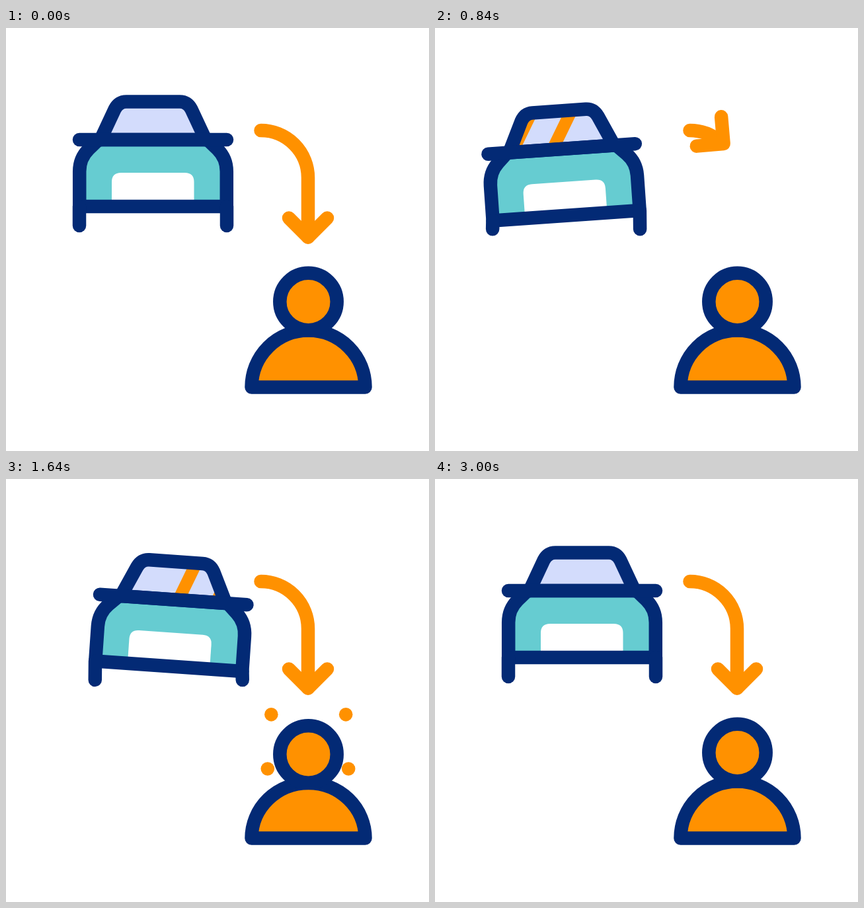
Write an HTML page with a canvas that moves like this. It is 640 px wide and 640 px high and loops after 3320 ms.

```html
<!DOCTYPE html>
<html lang="en">
<head>
<meta charset="utf-8">
<title>Car handover</title>
<style>
  html, body { margin: 0; width: 100%; height: 100%; overflow: hidden; background: #fff; }
  canvas { display: block; width: 640px; height: 640px; }
</style>
</head>
<body>
<canvas id="stage" width="640" height="640"></canvas>
<script>
const LOOP = 3320;
const NAVY = '#032a75', ORANGE = '#ff9100', TEAL = '#66ccd1', GLASS = '#d3dcfc';
const ctx = document.getElementById('stage').getContext('2d');

// Key tables: [time, value] pairs
const WHEEL_X = [[220, 0], [540, -23.5], [750, -24], [1750, 24], [2260, 0]];
const WHEEL_Y = [[220, 0], [540, 5], [1250, 6], [1750, 5], [2260, 0]];
const SAG = [[220, 0], [780, 8.4], [1750, 8.2], [2260, 0]];
const TILT = [[220, 0], [780, -4], [1750, 4], [2260, 0]];
const SHINE = [[200, -80], [520, -31], [840, 12.5], [1340, 68], [1640, 106.5], [2050, 160]];
const REACH = [[220, 202.3], [520, 75], [840, 56], [930, 55], [1340, 87], [1610, 202.3]];
const NUDGE = [[1640, 0], [2340, -12.8], [3000, 0]];
const INSET = [[45, -1], [60, 3.5], [70, 3], [90, 0]];
const DIP = [[1560, 0], [1640, 2.5], [1730, 4], [2000, 0]];
const SPREAD = [[1500, 0.3], [1640, 1], [1820, 1.38], [1960, 1.58], [2240, 1.66]];
const DOT_R = [[1960, 10.3], [2240, 0]];
const DOTS = [[-56, -57.5], [56.5, -57.5], [-61.5, 24.5], [60.5, 24.5]];

// Cubic in-out between keys
function ease(keys, t) {
  if (t <= keys[0][0]) return keys[0][1];
  for (let i = 1; i < keys.length; i++) {
    const [t0, a] = keys[i - 1], [t1, b] = keys[i];
    if (t < t1) {
      const x = (t - t0) / (t1 - t0);
      return a + (b - a) * (x < 0.5 ? 4 * x ** 3 : 1 - 4 * (1 - x) ** 3);
    }
  }
  return keys[keys.length - 1][1];
}

// Monotone curve through the keys
function flow(keys, t) {
  const last = keys.length - 1;
  if (t <= keys[0][0]) return keys[0][1];
  if (t >= keys[last][0]) return keys[last][1];
  const slope = i => (keys[i + 1][1] - keys[i][1]) / (keys[i + 1][0] - keys[i][0]);
  const tangent = i => {
    if (i === 0 || i === last) return 0;
    const a = slope(i - 1), b = slope(i);
    return a * b <= 0 ? 0 : 2 * a * b / (a + b);
  };
  let i = 0;
  while (t >= keys[i + 1][0]) i++;
  const [t0, a] = keys[i], [t1, b] = keys[i + 1];
  const h = t1 - t0, x = (t - t0) / h, y = 1 - x;
  return a * (1 + 2 * x) * y * y + b * (3 - 2 * x) * x * x
    + h * x * y * (tangent(i) * y - tangent(i + 1) * x);
}

const roof = new Path2D('M143 169 L164.5 123 Q170.5 111.5 182 111.5 H263 Q274.5 111.5 280.5 123 L302 169');
const shell = new Path2D('M111.2 270 V217 Q111.2 197 125 183.5 L140 169 H305 L320 183.5 Q333.8 197 333.8 217 V270 Z');
const grille = new Path2D('M160 262 V233 Q160 219 174 219 H270.5 Q284.5 219 284.5 233 V262 Z');
const bar = new Path2D('M111 169 H334');

function stroke(path, color = NAVY) {
  ctx.strokeStyle = color;
  ctx.stroke(path);
}

function fill(path, color) {
  ctx.fillStyle = color;
  ctx.fill(path);
}

function disc(x, y, r) {
  const p = new Path2D();
  p.arc(x, y, r, 0, Math.PI * 2);
  return p;
}

function drawCar(t) {
  const dx = ease(WHEEL_X, t), wheelY = ease(WHEEL_Y, t);
  const dy = wheelY + ease(SAG, t);
  const pose = new DOMMatrix()
    .translate(222.5 + dx, 270 + dy).rotate(ease(TILT, t)).translate(-222.5, -270);
  const posed = path => {
    const p = new Path2D();
    p.addPath(path, pose);
    return p;
  };

  const glass = posed(roof);
  fill(glass, GLASS);
  ctx.save();
  ctx.clip(glass);
  const right = 222.5 + dx + flow(SHINE, t);
  for (const x of [right, right - 59]) {
    fill(new Path2D(`M${x + 17.5} 100 L${x - 31} 200 h-20.5 L${x - 3} 100 Z`), ORANGE);
  }
  ctx.restore();

  const body = posed(shell);
  fill(body, TEAL);
  fill(posed(grille), '#fff');
  stroke(glass);
  stroke(body);
  stroke(posed(bar));
  for (const x of [111, 334]) {
    const top = pose.transformPoint(new DOMPoint(x, 270));
    stroke(new Path2D(`M${top.x} ${top.y} L${x + dx} ${299 + wheelY}`));
  }
}

function drawArrow(t) {
  const R = 71.5, cx = 385.5, cy = 226.5, quarter = R * Math.PI / 2;
  const s = t < 1640 ? flow(REACH, t) : 202.3 + ease(NUDGE, t);
  const bend = Math.min(s, quarter) / R;
  const r = R - flow(INSET, bend * 180 / Math.PI);
  const down = Math.max(0, s - quarter);
  const x = cx + r * Math.sin(bend), y = cy - r * Math.cos(bend) + down;
  const heading = Math.min(Math.PI / 2, (s - 6) / R);

  const shaft = new Path2D();
  shaft.arc(cx, cy, R, -Math.PI / 2, -Math.PI / 2 + heading);
  if (down) shaft.lineTo(x, y);
  stroke(shaft, ORANGE);

  ctx.save();
  ctx.translate(x, y);
  ctx.rotate(heading);
  stroke(new Path2D('M-29 -29 L0 0 L-29 29'), ORANGE);
  ctx.restore();
}

function drawPerson(t) {
  const dip = flow(DIP, t), cx = 457.5;
  if (t > 1500 && t < 2240) {
    const k = flow(SPREAD, t), r = ease(DOT_R, t);
    for (const [x, y] of DOTS) fill(disc(cx + x * k, 414 + y * k, r), ORANGE);
  }
  const torso = new Path2D(`M371.5 543.5 A86 ${86 - dip} 0 0 1 543.5 543.5 Z`);
  const head = disc(cx, 414 + dip, 43.2);
  for (const part of [torso, head]) {
    fill(part, ORANGE);
    stroke(part);
  }
}

function draw(t) {
  ctx.fillStyle = '#fff';
  ctx.fillRect(0, 0, 640, 640);
  ctx.lineWidth = 20.5;
  ctx.lineCap = ctx.lineJoin = 'round';
  drawCar(t);
  drawArrow(t);
  drawPerson(t);
}

const start = performance.now();
function tick() {
  draw((performance.now() - start) % LOOP);
  requestAnimationFrame(tick);
}
tick();
</script>
</body>
</html>
```
